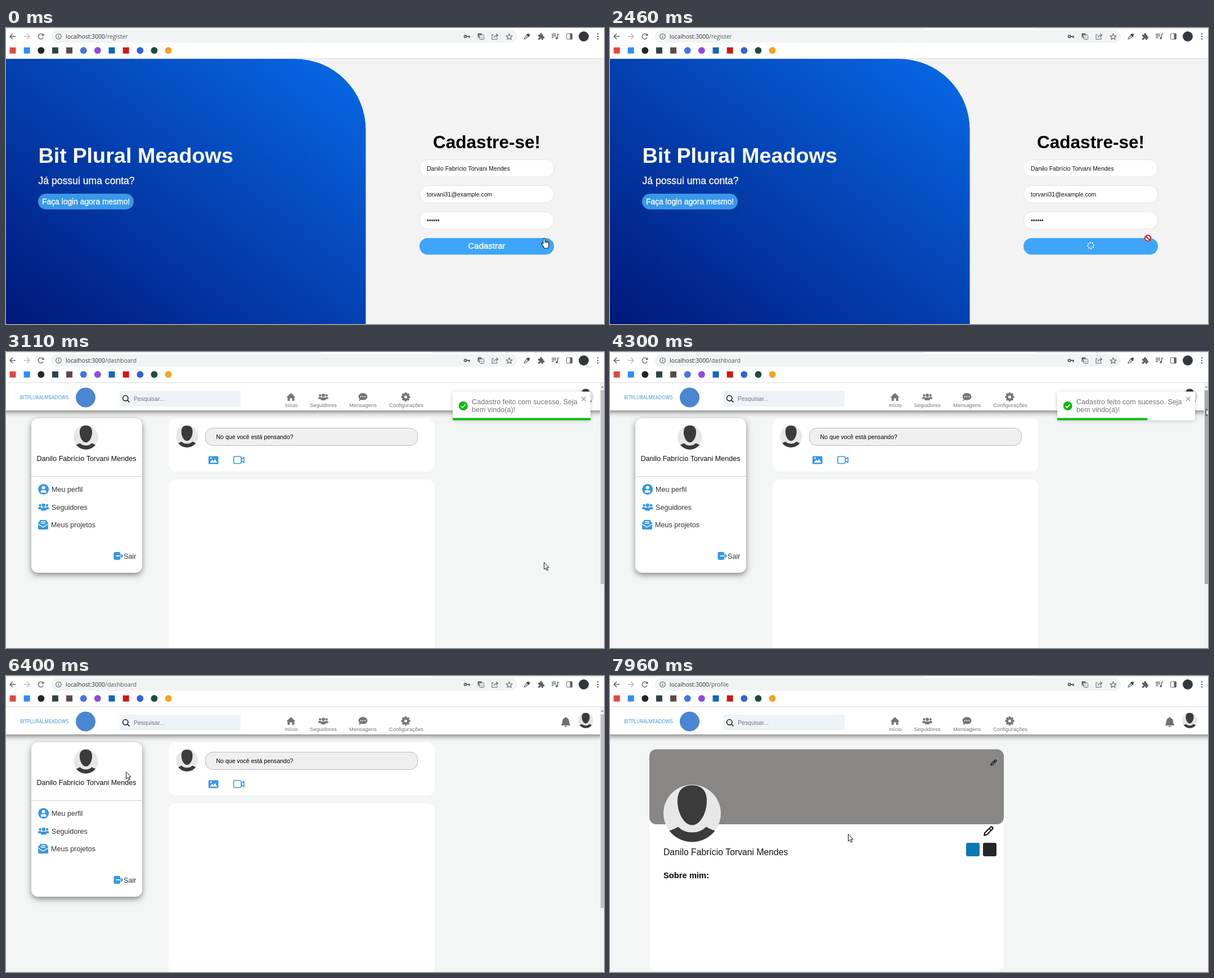
Recreate the animation shown at these times as an HTML page with a canvas. Size 1063x527 px, loop 8000 ms.

```html
<!DOCTYPE html>
<html lang="pt-BR">
<head>
<meta charset="utf-8">
<title>Cadastro</title>
<style>
html, body { margin: 0; width: 100%; height: 100%; overflow: hidden; background: #fff; }
canvas { display: block; width: 100%; height: 100%; }
</style>
</head>
<body>
<canvas id="stage" width="1063" height="527"></canvas>
<script>
const ctx = document.getElementById('stage').getContext('2d');
const W = 1063, H = 527, LOOP = 8000, STEP = 69.1, TAU = Math.PI * 2;
const ARIAL = '"Liberation Sans", Arial, sans-serif';
const USER = 'Danilo Fabrício Torvani Mendes';
const BLUE = '#3598e4', GREY = '#757575', GREEN = '#07bc0c', PAGE = '#f4f5f5';

// Scene changes and toast phases, in ms
const T = { click: 980, dash: 2520, url: 7270, profile: 7410 };
const TOAST = { enter: 2520, bar: 3260, hover: 4700, close: 5135, anim: 750, life: 3000 };

// Cursor tip: time, x, y
const route = [
  [3540, 956, 374], [3800, 985, 310], [4060, 1030, 190], [4290, 1060, 101],
  [4370, 1049, 97], [4700, 1040, 92], [5100, 1027, 83], [5195, 1020, 84],
  [5390, 565, 222], [5560, 420, 244], [5980, 286, 258], [6200, 258, 205],
  [6400, 205, 164], [6640, 145, 205], [6850, 114, 247], [6920, 111, 241],
  [7400, 111, 241], [7620, 300, 264], [7950, 423, 281]
];

function rect(x, y, w, h, color) { ctx.fillStyle = color; ctx.fillRect(x, y, w, h); }

function box(x, y, w, h, r, fill, line) {
  ctx.beginPath();
  ctx.roundRect(x, y, w, h, r);
  ctx.fillStyle = fill;
  ctx.fill();
  if (line) { ctx.strokeStyle = line; ctx.lineWidth = 1; ctx.stroke(); }
}

function dot(x, y, r, color) {
  ctx.beginPath();
  ctx.arc(x, y, r, 0, TAU);
  ctx.fillStyle = color;
  ctx.fill();
}

function ring(x, y, r, color, lw) {
  ctx.beginPath();
  ctx.arc(x, y, r, 0, TAU);
  ctx.strokeStyle = color;
  ctx.lineWidth = lw;
  ctx.stroke();
}

function shape(x, y, d, fill, line, lw = 1.4, k = 1) {
  ctx.save();
  ctx.translate(x, y);
  ctx.scale(k, k);
  const p = new Path2D(d);
  if (fill) { ctx.fillStyle = fill; ctx.fill(p); }
  if (line) { ctx.strokeStyle = line; ctx.lineWidth = lw; ctx.stroke(p); }
  ctx.restore();
}

function text(s, x, y, size, color, { weight = 400, align = 'left', font = ARIAL, edge = 0 } = {}) {
  ctx.font = `${weight} ${size}px ${font}`;
  ctx.textAlign = align;
  ctx.fillStyle = color;
  ctx.fillText(s, x, y);
  if (edge) {
    ctx.strokeStyle = color;
    ctx.lineWidth = edge;
    ctx.strokeText(s, x, y);
  }
}

function shadow(color, blur, dy) {
  ctx.shadowColor = color;
  ctx.shadowBlur = blur;
  ctx.shadowOffsetY = dy;
}

// Solves a CSS cubic-bezier curve by bisection
function bezier(x1, y1, x2, y2) {
  const at = (s, a, b) => 3 * (1 - s) ** 2 * s * a + 3 * (1 - s) * s * s * b + s ** 3;
  return u => {
    let lo = 0, hi = 1;
    for (let i = 0; i < 20; i++) {
      const mid = (lo + hi) / 2;
      if (at(mid, x1, x2) < u) lo = mid; else hi = mid;
    }
    return at(lo, y1, y2);
  };
}
const ease = bezier(0.25, 0.1, 0.25, 1);
const easeOut = bezier(0.215, 0.61, 0.355, 1);

// Piecewise interpolation over rows of [position, ...values]
function along(rows, p, curve = u => u) {
  if (p <= rows[0][0]) return rows[0].slice(1);
  for (let i = 1; i < rows.length; i++) {
    const a = rows[i - 1], b = rows[i];
    if (p < b[0]) {
      const u = curve((p - a[0]) / (b[0] - a[0]));
      return a.slice(1).map((v, j) => v + (b[j + 1] - v) * u);
    }
  }
  return rows[rows.length - 1].slice(1);
}

function avatar(x, y, r) {
  ctx.save();
  ctx.translate(x, y);
  ctx.scale(r / 51, r / 51);
  dot(0, 0, 51, '#e7e7e7');
  ctx.clip();
  shape(0, 0, 'M0-50C19-50 26-38 26-22C26 0 14 21 0 21C-14 21-26 0-26-22C-26-38-19-50 0-50Z', '#3b3b3b');
  shape(0, 0, 'M-52 34Q-34 30-25 24Q-15 34 0 34Q15 34 25 24Q34 30 52 34V52H-52Z', '#3b3b3b');
  ctx.restore();
}

function people(x, y, k, color) {
  ctx.save();
  ctx.translate(x, y);
  ctx.scale(k, k);
  for (const s of [-1, 1]) {
    dot(s * 6, -3, 2.2, color);
    box(s * 6.3 - 3, 0, 6, 4, [2, 2, 0, 0], color);
  }
  dot(0, -3, 3, color);
  box(-4.6, 0.8, 9.2, 5.4, [4, 4, 1, 1], color);
  ctx.restore();
}

function gear(x, y) {
  ctx.save();
  ctx.translate(x, y);
  for (let i = 0; i < 8; i++) {
    rect(-1.8, -8, 3.6, 4, GREY);
    ctx.rotate(TAU / 8);
  }
  ctx.restore();
  ring(x, y, 4.4, GREY, 3.8);
}

function pencil(x, y, k) {
  shape(x, y, 'M-7 7L-6 3L3-6Q4.5-7.5 6-6Q7.5-4.5 6-3L-3 6ZM1-4L4-1', null, '#111', 1.9, k);
}

function chrome(path, now) {
  const ink = '#5f6368';
  rect(0, 0, W, 55, '#fff');
  rect(0, 0, 560, 1, '#dee1e6');
  if (now >= T.click) rect(757, 0, 306, 1, '#dee1e6');
  box(80, 4, 828, 22, 11, '#f1f3f4');
  rect(0, 54, W, 1, '#dadce0');

  shape(12, 15, 'M5 0H-5M0-5L-5 0L0 5', null, ink, 1.5);
  shape(37, 15, 'M-5 0H5M0-5L5 0L0 5', null, '#b9bbbe', 1.5);
  ctx.beginPath();
  ctx.arc(62, 15, 4.6, 0.5, TAU - 0.7);
  ctx.strokeStyle = ink; ctx.lineWidth = 1.5; ctx.stroke();
  shape(62, 15, 'M5.4-5.4V-1H1Z', ink);
  ring(93.5, 15, 4.8, ink, 1.1);
  rect(93, 14.2, 1.2, 3.6, ink);
  rect(93, 12, 1.2, 1.2, ink);
  const host = 'localhost:3000', font = '"Open Sans", sans-serif';
  text(host, 106, 19, 10.4, '#303236', { font });
  text(path, 106 + ctx.measureText(host).width, 19, 10.4, '#55585c', { font });

  ring(816.5, 15, 2, ink, 2);
  shape(819, 15, 'M0 0H6M4.5 0V3', null, ink, 2);
  box(838.5, 9.5, 7, 8, 1, ink);
  box(842.5, 12.5, 7, 8, 1, '#fff', ink);
  text('A', 842, 16.5, 7, '#fff', { align: 'center' });
  text('x', 846, 19, 7, ink, { align: 'center' });
  shape(869, 15, 'M-2-3H-5V5H4V2M-2 2Q-1-2 5-2M2-5L5.5-2L2 1', null, ink, 1.1);
  shape(894.5, 15.5, 'M0-5.5L1.6-1.8L5.5-1.5L2.5 1L3.5 5L0 2.8L-3.5 5L-2.5 1L-5.5-1.5L-1.6-1.8Z', null, ink, 1.1);
  shape(926, 15, 'M-5 5L-4 2L1-3L3-1L-2 4Z', '#fff', ink, 1.2);
  shape(926, 15, 'M0-4L4 0M2-2L4.5-4.5', null, '#3c4043', 2.6);
  shape(951, 15, 'M-5-3H-2Q-2-6 0-6Q2-6 2-3H4V0Q6.5 0 6.5 2Q6.5 3.6 4 3.6V6H1Q1 3.5-.5 3.5Q-2 3.5-2 6H-5V3Q-3 3-3 1.5Q-3 0-5 0Z', ink);
  shape(976, 15, 'M-6-4H2M-6-1H2M-6 2H-2M4.5 3V-4H7', null, ink, 1.4);
  dot(979, 18, 2, ink);
  box(996.5, 10, 10, 10, 1, '#fff', ink);
  rect(1002.5, 10, 4, 10, ink);
  dot(1027, 15, 9, '#34373d');
  for (const y of [10.5, 15, 19.5]) dot(1052, y, 1.3, ink);

  // Bookmarks: plain marks, round or square
  const marks = ['#e0483c s', '#2d8cff s', '#22262a', '#2e4247 s', '#5d4a44 s', '#4673e6',
    '#9349dc', '#0a66c2 s', '#cf1712 s', '#2f62da', '#1f4c3c', '#f5a223'];
  marks.forEach((m, i) => {
    const [color, square] = m.split(' '), x = 12 + i * 25.15;
    if (square) rect(x - 5.5, 34.5, 11, 11, color);
    else dot(x, 40, 6, color);
  });
}

function registerPage(now, t) {
  rect(0, 55, W, H, '#f3f3f3');
  const g = ctx.createLinearGradient(94.6, 596.7, 545.4, -14.7);
  g.addColorStop(0, '#00187a');
  g.addColorStop(1, '#076ae8');
  box(0, 55, 639.5, 472, [0, 126, 0, 0], g);
  text('Bit Plural Meadows', 57.5, 240, 37.8, '#fff', { weight: 700 });
  text('Já possui uma conta?', 57.5, 278, 17.6, '#fff', { edge: 0.3 });
  box(57, 295, 170, 28, 14, '#3998e8');
  text('Faça login agora mesmo!', 64, 314, 13.85, '#fff', { edge: 0.3 });

  text('Cadastre-se!', 854.5, 214, 31.5, '#000', { weight: 700, align: 'center' });
  for (const y of [234.5, 280.5, 327.5]) box(735.5, y, 238, 30.5, 14, '#fff', '#e4e4e4');
  text(USER, 748, 253.5, 10.5, '#111');
  text('torvani31@example.com', 748, 300, 10.5, '#111');
  for (let i = 0; i < 6; i++) dot(750 + i * 3.75, 342.5, 1.4, '#111');
  box(735, 374, 239, 29.5, 14.7, '#3ea5fa');
  if (now < T.click) {
    text('Cadastrar', 854.5, 393, 15.1, '#fff', { align: 'center', edge: 0.4 });
    return;
  }
  for (let i = 0; i < 8; i++) {
    const a = (i / 8 + (t - T.click) / 2000) * TAU;
    dot(854.5 + 5.2 * Math.cos(a), 387.3 + 5.2 * Math.sin(a), 1.25, '#fff');
  }
}

function header() {
  ctx.save();
  shadow('rgba(0,0,0,.5)', 9, 3);
  rect(-20, 55, W + 40, 49, '#fff');
  ctx.restore();
  const name = 'BITPLURALMEADOWS', font = '"Open Sans", sans-serif';
  ctx.save();
  ctx.fontStretch = 'condensed';
  let size = 13.5;
  do {
    size -= 0.5;
    ctx.font = `500 ${size}px ${font}`;
  } while (ctx.measureText(name).width > 91 && size > 7);
  text(name, 25, 80.5 + size * 0.36, size, '#2f8bdc', { weight: 500, font });
  ctx.restore();
  dot(141.5, 81, 17.5, '#4a86d2');

  rect(202, 69, 215, 28, '#edf3f8');
  ring(212.3, 82.3, 4.7, '#111', 1.5);
  shape(216, 86, 'M0 0L3.5 3.5', null, '#111', 1.7);
  text('Pesquisar...', 227, 87, 10.5, GREY);

  shape(506.5, 80, 'M-8 .5L0-7L8 .5H6V7H2V2.5H-2V7H-6V.5Z', GREY);
  people(564, 80, 0.95, GREY);
  shape(634.5, 80, 'M0-7C4.6-7 8-4 8-.6C8 3 4.6 5.6 0 5.6Q-2 5.6-3.6 5Q-5 7-7.5 7Q-6 5-6 3.4Q-8 1.5-8-.6C-8-4-4.6-7 0-7Z', GREY);
  for (const d of [-3.8, 0, 3.8]) dot(634.5 + d, 79.5, 1.1, '#fff');
  gear(710.5, 80);
  const labels = [['Início', 507], ['Seguidores', 564], ['Mensagens', 634.5], ['Configurações', 711.5]];
  for (const [s, x] of labels) text(s, x, 97.5, 9.45, GREY, { align: 'center' });
  shape(995, 82, 'M0-9Q1.2-9 1.2-7.6Q6-6.5 6-1Q6 3 8 5V6H-8V5Q-6 3-6-1Q-6-6.5-1.2-7.6Q-1.2-9 0-9ZM-2.2 7H2.2Q2 9 0 9Q-2 9-2.2 7Z', '#707070');
  avatar(1030.5, 79, 13.7);
}

function dashboard(t) {
  rect(0, 55, W, H, PAGE);
  ctx.save();
  shadow('rgba(0,0,0,.45)', 11, 4);
  box(45, 118, 197, 275, 12, '#fff');
  ctx.restore();
  avatar(142, 152, 21.7);
  text(USER, 143, 194, 12.6, '#0a0a14', { align: 'center' });
  rect(45, 221, 197, 1, '#cfcfcf');

  dot(66.7, 244.5, 9.5, BLUE);
  dot(66.7, 241.5, 3, '#fff');
  box(61.7, 246, 10, 4.6, [4, 4, 2, 2], '#fff');
  text('Meu perfil', 81, 249, 12.6, '#333');
  people(66.8, 276, 1.03, BLUE);
  text('Seguidores', 81, 281, 12.6, '#333');
  shape(66, 307, 'M-9-3L-6-6V-8H6V-6L9-3V7Q9 9 7 9H-7Q-9 9-9 7Z', BLUE);
  shape(66, 307, 'M-4-5H4M-4-2H4M-9-1L-1.5 4Q0 5 1.5 4L9-1', null, '#fff', 1.5);
  text('Meus projetos', 80, 312, 12.6, '#333');
  box(191.5, 356, 11.5, 14, 2.5, BLUE);
  shape(199, 363, 'M-3 0H3', null, '#fff', 2);
  shape(199, 363, 'M3 0H8M5-3.4L8.4 0L5 3.4', null, BLUE, 1.6);
  text('Sair', 209, 367.5, 12.6, '#333');

  box(289, 118, 473, 94.5, 13, '#fff');
  avatar(321.7, 150.3, 19.6);
  box(354.5, 135.5, 377, 31, 13, '#efefef', '#bababa');
  text('No que você está pensando?', 373.5, 155, 10.55, '#000');
  box(360, 185.5, 17.5, 14, 1, BLUE);
  shape(360, 185, 'M2.5 12L6.5 6.5L9 9.5L11.5 5.5L15.5 12Z', '#fff');
  dot(364.5, 189, 1.4, '#fff');
  shape(404, 185, 'M2 1H12Q14 1 14 3V11.5Q14 13.5 12 13.5H2Q.8 13.5.8 11.5V3Q.8 1 2 1ZM14 6L19 2.5V12L14 8.5', null, BLUE, 1.6);
  box(289, 227, 473, 330, 13, '#fff');

  header();
  rect(1056, 55, 7, 472, '#f1f1f1');
  rect(1057, 68, 6, 345, t > 4230 && t < 4360 ? '#a9a9a9' : '#c1c1c1');
  shape(1060, 62, 'M-2.5 1.5L0-1.5L2.5 1.5Z', '#8a8a8a');
}

function profile() {
  rect(0, 55, W, H, PAGE);
  box(70, 130.5, 630, 393.5, 12, '#fff');
  box(70, 130.5, 630, 133.5, 12, '#898686');
  avatar(146, 244.5, 51);
  pencil(682, 154, 0.72);
  pencil(673, 276, 1.12);
  text(USER, 95, 319, 15.75, '#111');
  text('Sobre mim:', 95, 359.5, 14.75, '#000', { weight: 700 });
  box(633, 297, 24, 24, 3, '#0a78b6');
  box(663, 297, 24, 24, 3, '#24262a');
  header();
}

function toast(t) {
  const { enter, bar, hover, close, anim, life } = TOAST;
  const [dx, alpha] = t < close
    ? along([[0, 2360, 0], [0.6, -19.7, 1], [0.75, 7.9, 1], [0.9, -3.9, 1], [1, 0, 1]], (t - enter) / anim, easeOut)
    : along([[0, 0, 1], [0.2, -15.7, 1], [1, 1574, 0]], (t - close) / anim, ease);
  if (dx > 275) return;
  ctx.save();
  ctx.beginPath();
  ctx.rect(0, 55, 1056, 472);
  ctx.clip();
  ctx.globalAlpha = alpha;
  ctx.translate(dx, 0);
  ctx.save();
  shadow('rgba(0,0,0,.2)', 7, 1);
  box(795, 70.5, 245, 51, 3, '#fff');
  ctx.restore();
  dot(813.7, 96, 8, GREEN);
  shape(813.7, 96, 'M-4 .3L-1.2 3.2L4-3', null, '#fff', 1.8);
  text('Cadastro feito com sucesso. Seja', 829, 93, 12.6, GREY);
  text('bem vindo(a)!', 829, 107, 12.6, GREY);
  shape(1027.7, 83.5, 'M-3.6-3.6L3.6 3.6M3.6-3.6L-3.6 3.6', null, '#a5a5a5', 1.5);
  const left = 1 - Math.max(0, Math.min(t, hover) - bar) / life;
  rect(795, 117.5, 245 * left, 4, GREEN);
  ctx.restore();
}

function cursor(now, t) {
  if (now >= T.click && now < T.dash) {
    dot(956, 374.3, 6.2, '#fff');
    ring(956, 374.3, 5.2, '#c4161c', 2);
    shape(956, 374.3, 'M-3.6-3.6L3.6 3.6', null, '#c4161c', 2);
    return;
  }
  const [x, y] = along(route, t);
  const onToast = t > TOAST.hover && t < 5230, onLink = t > 6780 && now < T.profile;
  if (now < T.click || onToast || onLink) {
    shape(x + 0.5, y, 'M-1.6 1.4Q0-1 1.6 1.4V6Q3 5 4.1 6.3Q5.5 5.4 6.5 6.9Q8.4 6.4 8.4 8.4V12Q8.4 15 7 18H0Q-1 14.5-4.8 10.5Q-4.8 8-1.6 10Z', '#fff', '#111', 1.1);
    shape(x + 0.5, y, 'M1.6 6V9M4.1 6.5V9.5M6.5 7V9.5', null, '#111', 0.9);
  } else {
    shape(x + 0.5, y + 0.5, 'M0 0V12.6L3 10L5 14.6L7 13.7L5 9.2H8.6Z', '#fff', '#111', 1);
  }
}

function draw(now) {
  const t = T.click + Math.floor((now - 960) / STEP) * STEP;
  ctx.clearRect(0, 0, W, H);
  ctx.lineJoin = 'round';
  if (now < T.dash) registerPage(now, t);
  else if (now < T.profile) dashboard(t);
  else profile();
  if (t > TOAST.enter && t < TOAST.close + TOAST.anim) toast(t);
  chrome(now < T.dash ? '/register' : now < T.url ? '/dashboard' : '/profile', now);
  cursor(now, t);
}

let start;
function tick(now) {
  start ??= now;
  draw((now - start) % LOOP);
  requestAnimationFrame(tick);
}
requestAnimationFrame(tick);
</script>
</body>
</html>
```
